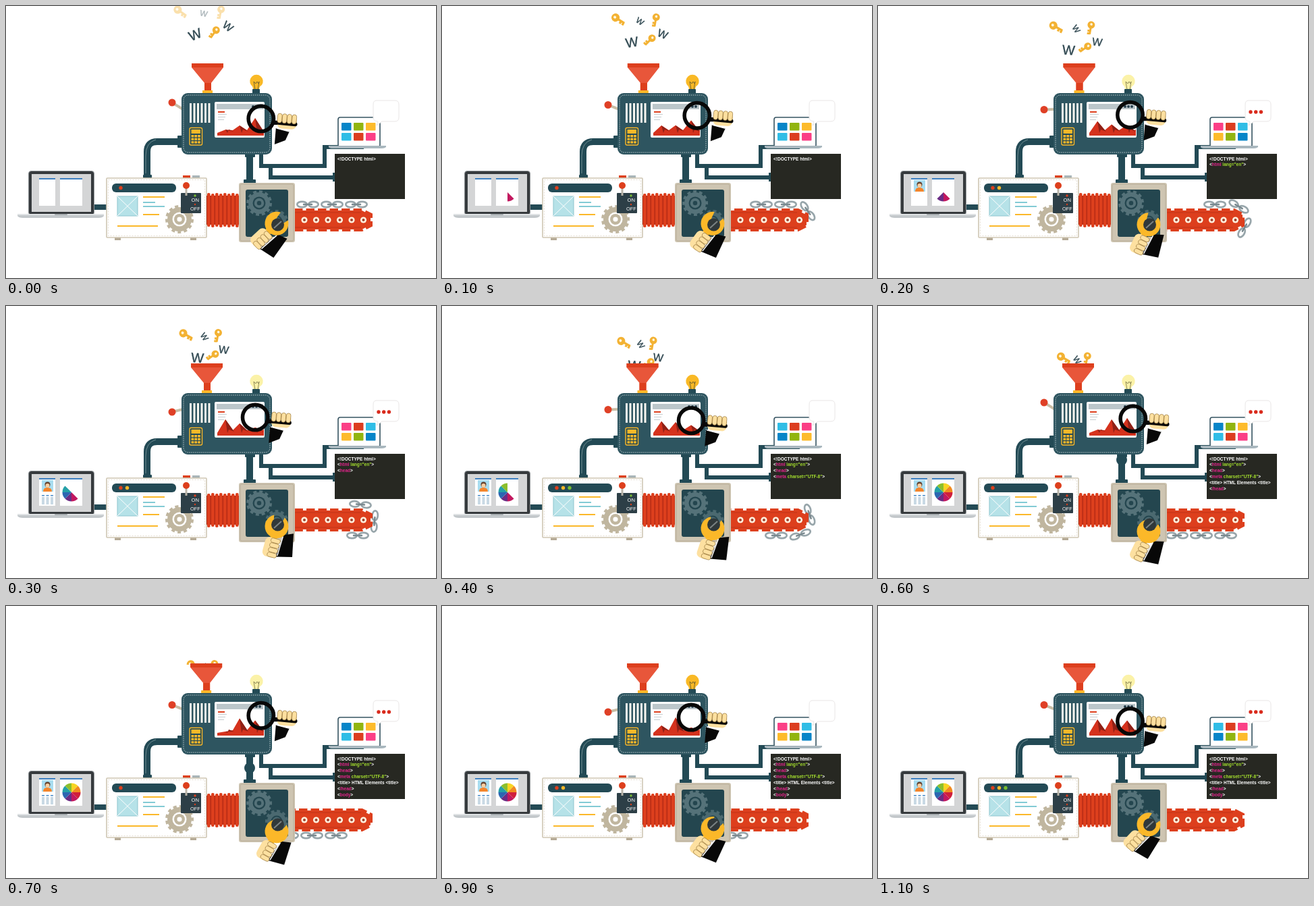
Write an HTML page that moves like this. It is 637 by 403 pixels and loops after 1.2 s.

```html
<!DOCTYPE html>
<html lang="en">
<head>
<meta charset="utf-8">
<title>Web machine</title>
<style>
html, body { margin: 0; width: 100%; height: 100%; overflow: hidden; background: #fff; }
svg { display: block; width: 637px; height: 403px; }
text { font-family: "Liberation Sans", Arial, sans-serif; white-space: pre; }
</style>
</head>
<body>
<svg id="stage" viewBox="0 0 637 403"></svg>
<script>
const stage = document.getElementById('stage');
const TEAL = '#2e5560', PIPE = '#234a55', PIT = '#24464f', RED = '#dd3f1d', AMBER = '#fbb829';
const BEIGE = '#cec5b2', SKIN = '#fde0a0', INK = '#080808', SKY = '#83cbd5';
const STEP = 100, STEPS = 12;

// Drawing helpers
const rect = (x, y, w, h, fill, rx = 0, more = '') => `<rect x="${x}" y="${y}" width="${w}" height="${h}" fill="${fill}" rx="${rx}" ${more}/>`;
const dot = (x, y, r, fill, more = '') => `<circle cx="${x}" cy="${y}" r="${r}" fill="${fill}" ${more}/>`;
const shape = (d, fill, more = '') => `<path d="${d}" fill="${fill}" ${more}/>`;
const line = (d, color, w, more = '') => shape(d, 'none', `stroke="${color}" stroke-width="${w}" ${more}`);
const group = (x, y, turn, body, more = '') => `<g transform="translate(${x} ${y}) rotate(${turn})" ${more}>${body}</g>`;
const clip = (id, body) => `<g clip-path="url(#${id})">${body}</g>`;
const text = (x, y, size, fill, body, more = '') => `<text x="${x}" y="${y}" font-size="${size}" fill="${fill}" ${more}>${body}</text>`;
const repeat = (n, draw) => Array.from({ length: n }, (_, i) => draw(i)).join('');

// Swings from 1 to -1 and back once per period, highest at peak
const wave = (step, period, peak = 0) => Math.cos((step - peak) / period * 2 * Math.PI);
const phase = step => Math.floor(step / 2);

function gear(x, y, r, teeth, color, hole, turn) {
  return dot(x, y, r - 3, color) +
    dot(x, y, r - 2.5, 'none', `stroke="${color}" stroke-width="5" pathLength="${teeth * 2}" stroke-dasharray="1.1 .9" stroke-dashoffset="${turn}"`) +
    dot(x, y, r * .5, hole) + dot(x, y, r * .38, color) + dot(x, y, r * .17, hole);
}

function pipes(step) {
  const bulge = step > 5 && step < 9 ? dot(361, 240 + (step - 7) * 12, 8, PIPE) : '';
  return line('M258 201H224Q209 201 209 216V252', PIPE, 10) +
    line('M222 198Q207 202 207 222V248', '#6d8b91', 1) +
    rect(254, 192, 7, 18, PIPE, 1) + rect(203, 250, 13, 5, PIPE, 1) +
    rect(356, 220, 10, 43, PIPE) + rect(354, 219, 15, 5, PIPE, 1) + rect(352, 257, 18, 6, PIPE, 1) + bulge +
    line('M378 218V237H472V209H530M392 237V254H488', PIPE, 6) +
    rect(484, 247, 4, 13, PIPE) + rect(129, 294, 22, 8, PIPE);
}

// Letters and keys drop towards the funnel, turning at first
const ITEMS = [
  { key: 1.1, x: 258, y: 8, turn: 35, spin: -3 },
  { size: 12, x: 293, y: 11, turn: 12, spin: 22 },
  { key: 1, x: 318, y: 9, turn: 100, spin: 0 },
  { size: 20, x: 280, y: 42, turn: -22, spin: 13 },
  { key: 1, x: 309, y: 39, turn: 125, spin: 10 },
  { size: 16, x: 329, y: 30, turn: 38, spin: -15 }
];
function falling(step) {
  return clip('air', ITEMS.map(({ key, size, x, y, turn, spin }) => {
    const body = key
      ? `<g transform="scale(${key})">` + line('M-2 0H10M5 0v4M9 0v4', '#f3b233', 3) + dot(-4, 0, 5.5, '#f3b233') + dot(-5, 0, 1.8, '#fff8e0') + '</g>'
      : text(0, size * .36, size, '#324a53', 'W', 'text-anchor="middle" stroke="#324a53" stroke-width=".4"');
    const top = y + step * 11.5;
    return group(x + (298 - x) * step * .07, top, turn + spin * Math.min(step, 2), body, `opacity="${top < 15 ? .4 : 1}"`);
  }).join(''));
}

function funnel(step) {
  const body = shape('M275 85H322V91L304 114V126H294V114L275 91Z', '#e8563a') +
    rect(275, 85, 47, 6, RED) + shape('M294 114H304V126H294Z', RED) + rect(291, 125, 15, 5, AMBER);
  return group(wave(step, STEPS) - 1, 0, 0, body);
}

function lamp(on) {
  return shape('M366 124Q366 119 363 117A9.7 9.7 0 1 1 379 117Q375 119 375 124Z', on ? '#f9b926' : '#fbf2a8') +
    line('M369 124L367 112L370 115L372 112L374 115L375 112L373 124', on ? '#76662d' : '#8f8a58', 1) +
    rect(365, 123, 11, 7, PIPE, 1);
}

function chart(step) {
  const peaks = [
    [325, 177 - 9 * wave(step, 8, 3)],
    [346, 171 + 6 * wave(step, 18)],
    [369, 173 - 7 * wave(step, 6)]
  ];
  const hills = peaks.map(([x, y]) => `L${x} ${y}L${x + 11} 184`).join('');
  return clip('screen', shape(`M313 192V188${hills}L383 182V192Z`, '#d5321d') +
    peaks.map(([x, y]) => shape(`M${x} ${y}L${x + 13} 186L${x + 5} 183L${x + 3} 188Z`, '#8f2016')).join(''));
}
function monitor(step) {
  const y = 150 - 7 * wave(step, 6);
  return line(`M246 ${y}L262 153`, '#c9bda5', 4) + dot(246, y, 5.5, '#df4026') +
    rect(260, 129, 134, 91, TEAL, 9) +
    rect(263, 132, 128, 85, 'none', 7, 'stroke="#b9c9cb" stroke-width="1" stroke-dasharray="1.5 1.5"') +
    repeat(6, i => rect(272 + i * 5.5, 144, 3, 29, '#f5f5ef')) +
    rect(272, 180.5, 18.5, 25.5, PIPE, 2, `stroke="${AMBER}" stroke-width="1.4"`) + rect(274.5, 183, 13.5, 6, AMBER) +
    repeat(9, i => rect(274.5 + i % 3 * 4.8, 191 + Math.floor(i / 3) * 4.6, 3.8, 3.4, AMBER)) +
    rect(309, 142, 74, 53, '#fff', 2) + rect(312, 145, 69, 8, '#bcc6ca') +
    repeat(3, i => dot(366 + i * 5, 149, 2, '#263f4d')) +
    rect(314, 156, 10, 2, RED) + repeat(3, i => rect(314, 160 + i * 4, 13 - i * 2, 1, '#c5cdd0')) + chart(step);
}

function fist(held = '') {
  return rect(-14, -9, 29, 20, SKIN, 7) + held +
    repeat(4, i => rect(-14 + i * 7.2, -11, 6.6, 14, SKIN, 3.3, 'stroke="#8a6a30" stroke-width=".6"'));
}

function magnifier(step) {
  const x = 373.5 + 5 * wave(step, 6, .5), y = 166 - 5 * wave(step, 6, 1.7);
  return group(x, y, 0,
    shape('M22 14L42 19L36 32L20 38Z', INK) + line('M23 14L42 19', '#fff', 1.5) +
    dot(0, 0, 18.7, 'none', `stroke="${INK}" stroke-width="5.5"`) +
    line('M18 6H30', INK, 6) +
    group(38, 4, 5, fist(line('M-16 3H13', INK, 6, 'stroke-linecap="round"'))));
}

const SLICES = ['#c2185f', '#6b2c85', '#2c66b1', '#25a0a8', '#8cbf2d', '#f8d523', '#f18a21', '#d01f3c'];
function pie(n) {
  const at = i => `${97 + 13.5 * Math.cos((i + 1) * Math.PI / 4)} ${276 + 13.5 * Math.sin((i + 1) * Math.PI / 4)}`;
  return repeat(n, i => shape(`M97 276L${at(i)}A13.5 13.5 0 0 1 ${at(i + 1)}Z`, SLICES[i]));
}
function notebook(step) {
  const photo = rect(53, 258, 17, 17, '#a8ddf0') + shape('M55 275Q55 269 61 269Q68 269 68 275Z', '#f4852b') +
    dot(61.5, 264.5, 4, '#65422e') + dot(61.5, 266, 3, '#f8cfa1');
  const bars = repeat(3, i => rect(53 + i * 6.5, 280, 4, 1.5, '#4a8cc8') + rect(53 + i * 6.5, 283, 4, 11, '#c9d9e4'));
  return rect(33.5, 244.5, 97, 65, '#363a3d', 4, 'stroke="#8f9496" stroke-width="1"') + rect(38, 249, 88, 56, '#d4d5d6') +
    [[49, 24], [80, 33]].map(([x, w]) => rect(x, 255, w, 41, '#fff') + rect(x, 255, w, 2, '#3c7fc0')).join('') +
    (step > 1 ? photo : '') + (step > 2 ? bars : '') + pie(Math.min(8, Math.floor(step * 1.4))) +
    shape('M17 308H145V311Q143 314 137 314H25Q19 314 17 311Z', '#c3c8cb') + rect(17, 308, 128, 2, '#e0e3e5') + rect(72, 308, 19, 2, '#a7adb0', 1);
}

function browser(step) {
  const lights = [RED, AMBER, '#77bd2f'].slice(0, phase(step) % 3 + 1);
  return rect(161, 342, 9, 5, '#b5aa96') + rect(273, 342, 9, 5, '#b5aa96') +
    rect(262, 251, 11, 4, RED) + rect(276, 251, 11, 4, '#a9b5b8') +
    rect(149, 255, 148, 88, '#fff', 1, 'stroke="#cfc6b3" stroke-width="1.6"') +
    rect(151.5, 257.5, 143, 83, 'none', 0, 'stroke="#ddd5c5" stroke-width=".8" stroke-dasharray="2 2"') +
    rect(157, 263, 95, 13, PIPE, 6) + lights.map((c, i) => dot(170 + i * 9.5, 269.5, 2.7, c)).join('') +
    rect(165, 282, 30, 29, '#b6e2e8', 0, 'stroke="#8dc5ce" stroke-width="1"') + line('M165 282L195 311M195 282L165 311', '#fff', 1) +
    rect(203, 282, 32, 2, AMBER) + rect(203, 290, 18, 2, SKY) + rect(203, 296, 32, 2, SKY) +
    rect(203, 308, 24, 2, AMBER) + rect(165, 325, 60, 2, AMBER) +
    gear(257, 316, 21, 13, '#c0b69f', '#fff', step * .65) +
    rect(259, 277, 30, 30, '#2d3f47', 1) + line('M267 266V281', '#b9b4a8', 3) + dot(267, 266, 5, RED) +
    dot(280, 281, 1.7, step % 4 < 2 ? '#77bd2f' : RED) +
    text(274.5, 290, 7.6, '#fff', 'ON') + text(273, 303, 7.4, '#fff', 'OFF') + dot(280, 294, 1.2, RED);
}

function bellows(step) {
  return rect(297, 281, 49, 43, '#b32a15') +
    repeat(8, i => rect(298 + i * 6, 277 + (i + step) % 2, 4.6, 50, RED, 2));
}

// s is the distance travelled along the belt: top run, round end, bottom run
function chain(s) {
  const top = 96, bend = 72;
  const a = Math.min(1, Math.max(0, (s - top) / bend)) * Math.PI;
  const x = 523 + Math.min(0, s - top) - Math.max(0, s - top - bend) + 23 * Math.sin(a);
  const link = at => `<ellipse cx="${at}" cy="0" rx="7.2" ry="4.2" fill="none" stroke="#97a5aa" stroke-width="2.7"/>`;
  return group(x, 317 - 23 * Math.cos(a), a * 180 / Math.PI,
    link(-8.5) + link(8.5) + line('M-6 0H6', '#78888e', 2.5, 'stroke-linecap="round"'));
}
function conveyor(step) {
  const edge = 'M427 304H527L539 310V324L527 330H427';
  return clip('belt', repeat(3, i => chain(20 + 26 * step + i * 36))) +
    shape(edge + 'Z', RED, `stroke="${RED}" stroke-width="2"`) +
    line(edge, RED, 8, `stroke-dasharray="12.5 5" stroke-dashoffset="${-step * 6}"`) +
    line('M427 306H526M427 328H526', '#b83119', .8) +
    repeat(6, i => dot(442 + i * 17.5, 317, 4.6, '#fff0de') + dot(442 + i * 17.5, 317, 2, '#9d4430'));
}

function box(step) {
  return rect(345, 262, 83, 88, BEIGE, 3) + rect(347, 264, 79, 84, 'none', 2, 'stroke="#b8ad98" stroke-width="1"') +
    rect(355, 272, 63, 70, PIT, 3) +
    gear(375, 292, 19, 12, '#557279', PIT, step * .65) + gear(401, 319, 17, 11, '#4b6970', PIT, -step * .65);
}

// A quick pull upright, then a slow return
function wrench(step) {
  const pull = step < 3 ? 1 - step / 3 : (step - 3) / 9;
  return group(401, 328 - 6 * wave(step, STEPS, .5), 15 + 32 * pull,
    shape('M13 10L27 4L34 38L10 44Z', INK) + line('M13 12L12 42', '#fff', 1.5) +
    shape('M-8 -15.5A17.5 17.5 0 1 0 8 -15.5L6 -5H-6Z', AMBER) +
    rect(-5, 13, 10, 32, AMBER, 4) + group(0, 32, 90, fist())) +
    dot(402.5, 324, 9.5, '#30383a') + line('M397 329L408 319', '#7b8384', 2);
}

const PALETTE = ['#0785c8', '#91b510', '#fdbb2b', '#30bde6', '#dc3d20', '#fb3f86'];
function tablet(step) {
  const orders = [i => i, i => 5 - i, i => (i + 3) % 6];
  const order = orders[phase(step) % 3];
  return rect(492, 165, 62, 44, '#fff', 3, 'stroke="#365461" stroke-width="1.6"') +
    repeat(6, i => rect(497 + i % 3 * 18, 173 + Math.floor(i / 3) * 15, 14.5, 11.5, PALETTE[order(i)], 1)) +
    shape('M478 207H563V209Q561 211 557 211H484Q479 211 478 209Z', '#a9b7be') +
    shape('M549 140H576Q582 140 582 146V165Q582 171 576 171H557L549 177L551 171Q544 171 544 165V146Q544 140 549 140Z', '#fff', 'stroke="#e9e6e6" stroke-width="1"') +
    (step % 4 > 1 ? repeat(3, i => dot(552 + i * 7.7, 157, 2.7, '#d92a1c')) : '');
}

const tag = name => `&lt;<tspan fill="#e3248c">${name}</tspan>`;
const attr = body => `<tspan fill="#a6e22e"> ${body}</tspan>&gt;`;
const CODE = [
  '&lt;!DOCTYPE html&gt;', tag('html') + attr('lang="en"'), tag('head') + '&gt;', tag('meta') + attr('charset="UTF-8"'),
  '&lt;title&gt; HTML Elements &lt;title&gt;', tag('/head') + '&gt;', tag('body') + '&gt;'
];
function editor(step) {
  return rect(487, 219, 104, 67, '#272822') +
    CODE.slice(0, Math.max(1, step)).map((s, i) => text(491, 228.5 + i * 8.9, 6.5, '#fff', s, 'font-weight="bold"')).join('');
}

const DEFS = `<defs><clipPath id="air">${rect(230, 0, 130, 87, INK)}</clipPath>
<clipPath id="screen">${rect(312, 155, 70, 38, INK)}</clipPath>
<clipPath id="belt">${rect(427, 280, 140, 80, INK)}</clipPath></defs>`;

function draw(step) {
  const on = step % 4 < 2;
  stage.innerHTML = DEFS + pipes(step) + falling(step) + funnel(step) + lamp(on) + monitor(step) + magnifier(step) +
    notebook(step) + browser(step) + bellows(step) + conveyor(step) + box(step) + wrench(step) + tablet(step) + editor(step);
}

const start = performance.now();
let last = -1;
function tick() {
  const step = Math.floor((performance.now() - start) / STEP) % STEPS;
  if (step !== last) draw(last = step);
  requestAnimationFrame(tick);
}
tick();
</script>
</body>
</html>
```
